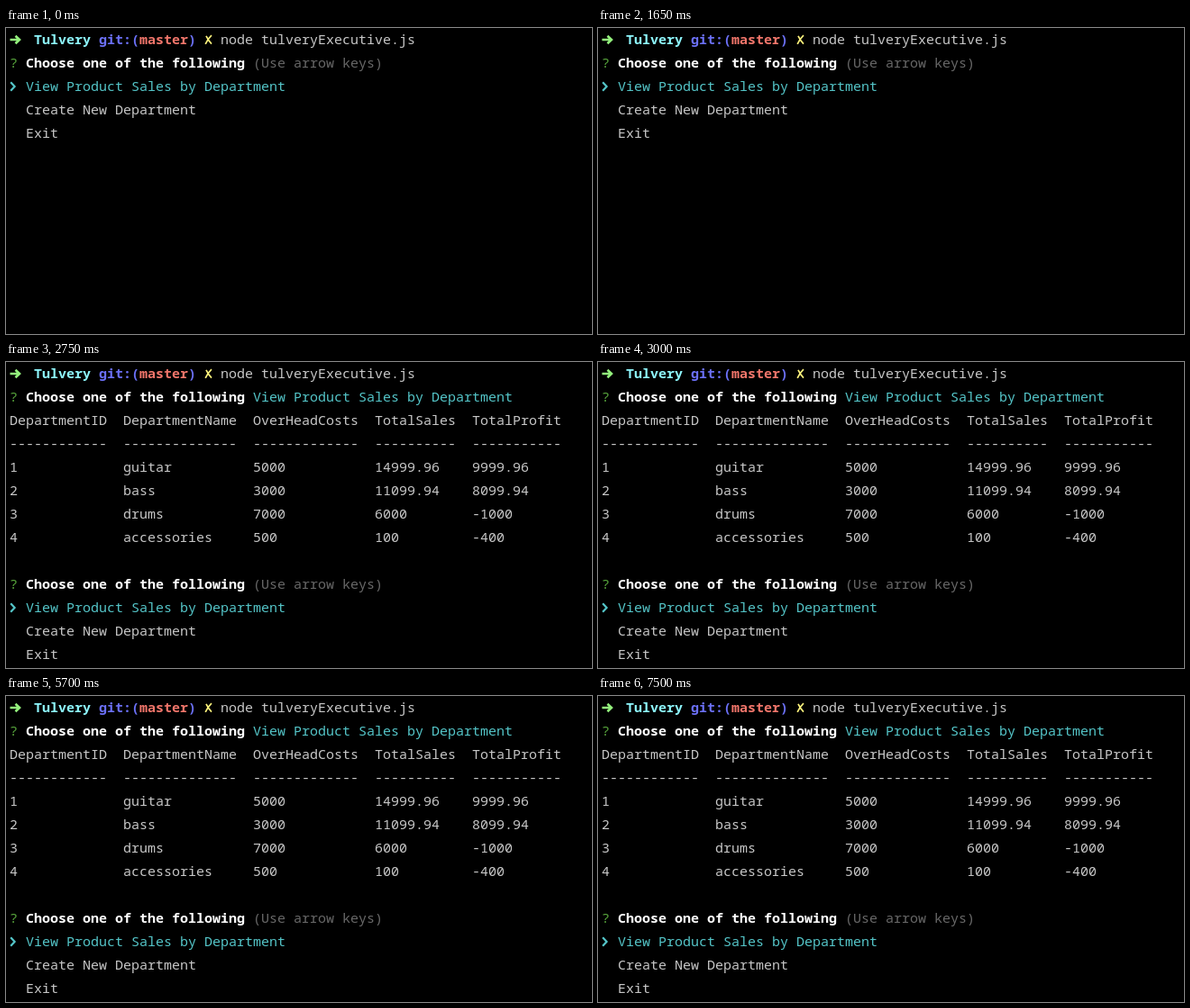
Recreate the animation shown at these times as an HTML page. Size 650x340 px, loop 7.75 s.

```html
<!DOCTYPE html>
<html lang="en">
<head>
<meta charset="utf-8">
<title>Terminal menu</title>
<style>
  html, body { margin: 0; width: 100%; height: 100%; overflow: hidden; background: #000; }
  svg { display: block; }
  text {
    font: 15px "Roboto Mono", "Noto Sans Mono", "Liberation Mono", monospace;
    font-variant-ligatures: none;
    white-space: pre;
  }
  .bold { font-weight: 700; }
</style>
</head>
<body>
<svg id="stage" width="650" height="340" viewBox="0 0 650 340"></svg>
<script>
const LOOP = 7750, ANSWER_AT = 2750;
const CELL = 9, ROW = 26, LEFT = 4, BASELINE = 18;
const color = {
  plain: '#c7c7c7', white: '#ffffff', dim: '#686868',
  green: '#58a63c', cyan: '#54c5c8',
  lime: '#93f07c', aqua: '#8df5fb', blue: '#6b70f6', red: '#f2766b', yellow: '#fdf37c'
};
const stage = document.getElementById('stage');

function add(parent, tag, attrs = {}) {
  const el = document.createElementNS('http://www.w3.org/2000/svg', tag);
  for (const [key, value] of Object.entries(attrs)) el.setAttribute(key, value);
  return parent.appendChild(el);
}

function write(parent, row, col, string, fill = color.plain, weight = '') {
  add(parent, 'text', {
    x: LEFT + col * CELL, y: row * ROW + BASELINE, fill, class: weight
  }).textContent = string;
}

function symbol(parent, row, col, d, stroke, width) {
  add(parent, 'path', {
    d, stroke, fill: 'none', 'stroke-width': width,
    transform: `translate(${LEFT + col * CELL} ${row * ROW + 13})`
  });
}

function prompt(parent) {
  symbol(parent, 0, 0, 'M.5 0H10M6.5 -4.2L11 0L6.5 4.2', color.lime, 2.6);
  write(parent, 0, 3, 'Tulvery', color.aqua, 'bold');
  write(parent, 0, 11, 'git:(', color.blue, 'bold');
  write(parent, 0, 16, 'master', color.red, 'bold');
  write(parent, 0, 22, ')', color.blue, 'bold');
  symbol(parent, 0, 24, 'M1.2 4.8Q4 -1 8 -4.8M2 -4.2Q4.5 1 8 4.6', color.yellow, 1.7);
  write(parent, 0, 26, 'node tulveryExecutive.js');
}

function question(parent, row, note, fill) {
  write(parent, row, 0, '?', color.green);
  write(parent, row, 2, 'Choose one of the following', color.white, 'bold');
  write(parent, row, 30, note, fill);
}

function menu(parent, row) {
  question(parent, row, '(Use arrow keys)', color.dim);
  symbol(parent, row + 1, 0, 'M1.2 -4.8L5.6 0L1.2 4.8', color.cyan, 2.2);
  write(parent, row + 1, 2, 'View Product Sales by Department', color.cyan);
  write(parent, row + 2, 2, 'Create New Department');
  write(parent, row + 3, 2, 'Exit');
}

function table(parent, row) {
  const columns = [0, 14, 30, 45, 57];
  const heads = ['DepartmentID', 'DepartmentName', 'OverHeadCosts', 'TotalSales', 'TotalProfit'];
  const lines = [
    heads,
    heads.map(head => '-'.repeat(head.length)),
    ['1', 'guitar', '5000', '14999.96', '9999.96'],
    ['2', 'bass', '3000', '11099.94', '8099.94'],
    ['3', 'drums', '7000', '6000', '-1000'],
    ['4', 'accessories', '500', '100', '-400']
  ];
  lines.forEach((cells, i) =>
    cells.forEach((cell, j) => write(parent, row + i, columns[j], cell)));
}

function show(group, from, to) {
  const steps = [
    { opacity: from, offset: 0 },
    { opacity: to, offset: ANSWER_AT / LOOP },
    { opacity: to, offset: 1 }
  ].map(step => ({ ...step, easing: 'step-end' }));
  group.animate(steps, { duration: LOOP, iterations: Infinity });
}

prompt(stage);

const asking = add(stage, 'g');
menu(asking, 1);

const answered = add(stage, 'g', { opacity: 0 });
question(answered, 1, 'View Product Sales by Department', color.cyan);
table(answered, 2);
menu(answered, 9);

show(asking, 1, 0);
show(answered, 0, 1);
</script>
</body>
</html>
```
